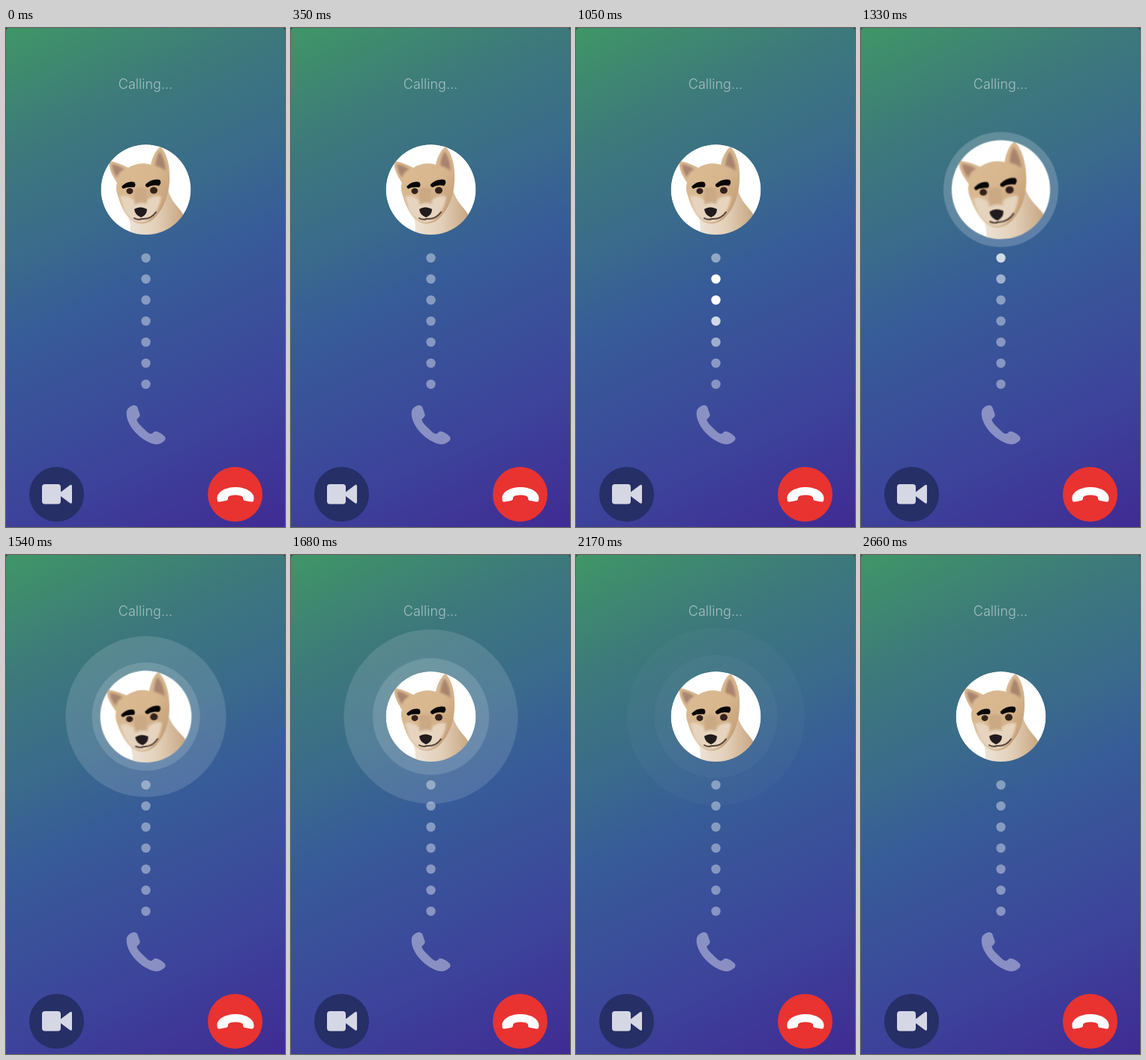
An HTML page for the animation above (2730 ms loop, 372 by 664 pixels).

```html
<!DOCTYPE html>
<html lang="en">
<head>
<meta charset="utf-8">
<title>Calling</title>
<style>
  html, body { margin: 0; width: 372px; height: 664px; overflow: hidden; background: #24433f; }
  .stage {
    width: 372px; height: 664px; overflow: hidden; border-radius: 4px 4px 0 0;
    background: linear-gradient(155deg, #3f9666, #3d787c 21%, #3a6c8a 36%, #375c98 50%, #3c469b 75%, #402b94);
  }
  svg { display: block; }
  .label { font: 300 18px Inter, Roboto, sans-serif; fill: #fff; fill-opacity: .53; text-anchor: middle; }

  .dots circle, .phone, .wiggle, .ring { animation: 2730ms linear infinite; }
  .dots circle {
    fill: #fff; opacity: .4;
    animation-name: glow; animation-delay: calc(460ms + var(--k) * 93ms);
  }
  .phone { fill: #fff; opacity: .4; animation-name: light; animation-delay: 420ms; }
  .wiggle { animation-name: wiggle; animation-delay: var(--start); transform-origin: 186.5px var(--y); }
  .ring { fill: #fff; opacity: 0; transform-origin: 186.5px 215px; }
  .outer { animation-name: outer; animation-delay: 1210ms; }
  .inner { animation-name: inner; animation-delay: 1330ms; }

  @keyframes glow {
    0%, 20.5%, 100% { opacity: .4; }
    2.8% { opacity: .53; }
    4.6%, 8.4% { opacity: 1; }
    11.4% { opacity: .78; }
    14.8% { opacity: .53; }
    18.2% { opacity: .42; }
  }
  @keyframes light {
    0%, 20.5%, 100% { opacity: .4; }
    4.8%, 14% { opacity: 1; }
  }
  @keyframes wiggle {
    0%, 17.95%, 100% { transform: none; }
    3.85% { transform: scale(1.1) rotate(var(--tilt)); }
    7.69% { transform: scale(1.1) rotate(calc(var(--tilt) * -1)); }
    11.54% { transform: scale(1.08) rotate(var(--tilt)); }
    15.38% { transform: scale(1.02) rotate(calc(var(--tilt) * -1)); }
  }
  @keyframes outer {
    0% { transform: scale(1); opacity: .2; }
    4.4% { transform: scale(1.275); opacity: .2; }
    12.09% { transform: scale(1.783); opacity: .14; }
    16.5% { transform: scale(1.93); opacity: .13; }
    24.9% { transform: scale(1.975); opacity: .13; }
    38%, 100% { transform: scale(1.975); opacity: 0; }
  }
  @keyframes inner {
    0% { transform: scale(1); opacity: .15; }
    7.69% { transform: scale(1.2); opacity: .15; }
    15.4% { transform: scale(1.34); opacity: .15; }
    20.5% { transform: scale(1.367); opacity: .15; }
    33.6%, 100% { transform: scale(1.367); opacity: 0; }
  }
</style>
</head>
<body>
<div class="stage">
<svg width="372" height="664" viewBox="0 0 372 664">
  <defs>
    <clipPath id="disc"><circle cx="186.5" cy="215" r="60"/></clipPath>
    <filter id="soft"><feGaussianBlur stdDeviation="1.6"/></filter>
    <linearGradient id="fur" x1="0" y1="0" x2="1" y2="1">
      <stop offset="0" stop-color="#dcbc94"/>
      <stop offset=".55" stop-color="#d8b78f"/>
      <stop offset="1" stop-color="#bd946c"/>
    </linearGradient>
    <linearGradient id="chest" x1="0" y1="0" x2="1" y2="0">
      <stop offset="0" stop-color="#eee4d8"/>
      <stop offset=".5" stop-color="#e2cfb8"/>
      <stop offset="1" stop-color="#c6a27c"/>
    </linearGradient>
  </defs>

  <text class="label" x="186" y="81">Calling...</text>

  <circle class="ring outer" cx="186.5" cy="215" r="60"/>
  <circle class="ring inner" cx="186.5" cy="215" r="60"/>

  <g class="wiggle" style="--start:1120ms; --y:215px; --tilt:3.5deg">
    <g clip-path="url(#disc)">
      <circle cx="186.5" cy="215" r="60" fill="#fff"/>
      <path fill="url(#chest)" d="M163 277C168 268 166 258 162 248L214 206C217 230 231 238 237 249L240 277Z"/>
      <path fill="url(#fur)" d="M148 206C142 197 136 186 138 177C146 178 156 182 163 186C172 180 184 179 193 182C195 172 200 162 206 158C213 164 218 180 218 194C219 212 215 232 203 247C196 257 186 262 176 260C163 256 154 240 150 226C147 218 146 212 148 206Z"/>
      <g filter="url(#soft)">
        <path fill="#a9836d" d="M141 181Q151 183 158 188Q150 191 148 199Q142 191 141 181Z M205 164Q212 174 213 190Q206 185 199 183Q200 171 205 164Z"/>
        <path fill="#e6d4be" d="M152 224Q163 221 170 229Q178 225 188 229Q197 221 207 224Q205 241 195 251Q187 261 176 259Q163 255 157 242Z"/>
        <path fill="#cba984" d="M171 214Q179 210 187 214L188 234Q179 231 171 235Z"/>
      </g>
      <ellipse cx="165" cy="217" rx="4.5" ry="4" fill="#33221c"/>
      <ellipse cx="197" cy="216" rx="5" ry="4.5" fill="#33221c"/>
      <path fill="#080707" d="M154 211Q162 203 171 205Q174 209 171 212Q162 211 156 214Z M186 208Q195 200 205 202Q208 206 204 210Q195 208 189 212Q185 211 186 208Z"/>
      <path fill="#211b1d" d="M171 241Q179 236 188 241Q188 249 180 252Q172 249 171 241Z"/>
      <path fill="none" stroke="#55433b" stroke-width="2" stroke-linecap="round" d="M171 253Q176 256 181 254Q193 255 200 245"/>
    </g>
  </g>

  <g class="dots">
    <circle cx="186.5" cy="306" r="6.2" style="--k:6"/>
    <circle cx="186.5" cy="334" r="6.2" style="--k:5"/>
    <circle cx="186.5" cy="362" r="6.2" style="--k:4"/>
    <circle cx="186.5" cy="390" r="6.2" style="--k:3"/>
    <circle cx="186.5" cy="418" r="6.2" style="--k:2"/>
    <circle cx="186.5" cy="446" r="6.2" style="--k:1"/>
    <circle cx="186.5" cy="474" r="6.2" style="--k:0"/>
  </g>

  <g class="wiggle" style="--start:420ms; --y:528px; --tilt:8deg">
    <path class="phone" d="M164 505C168 501.500 172 501 175 504L178.500 514C179 517 177 518 175 520C173 522 177 527 182 531.500S190 540 193 540C195 540 196 538 198 537C201 536 208 540 211 543C214 546 212.500 549 209 551C204 555 198 555 190 551C177 545 166 533 162 521C160 514 160 508 164 505Z"/>
  </g>

  <circle cx="67.5" cy="620.5" r="36.5" fill="#262f66"/>
  <g fill="#d6d7e4">
    <rect x="48" y="607" width="25" height="26.5" rx="4"/>
    <path d="M73 617.5L85 608.5Q88 606.5 88 610V630.5Q88 634 85 632L73 623Z"/>
  </g>

  <circle cx="305.5" cy="620.5" r="36.5" fill="#e83331"/>
  <path fill="#fff" d="M306 611C319 611 330 617 330.5 625C330.5 629 330 631 327 630.5L319 629C316 628.5 316 627 316 625C316 622.5 310 621.5 306 621.5S296 622.5 296 625C296 627 296 628.5 293 629L285 630.5C282 631 281.5 629 281.5 625C282 617 293 611 306 611Z"/>
</svg>
</div>
</body>
</html>
```
